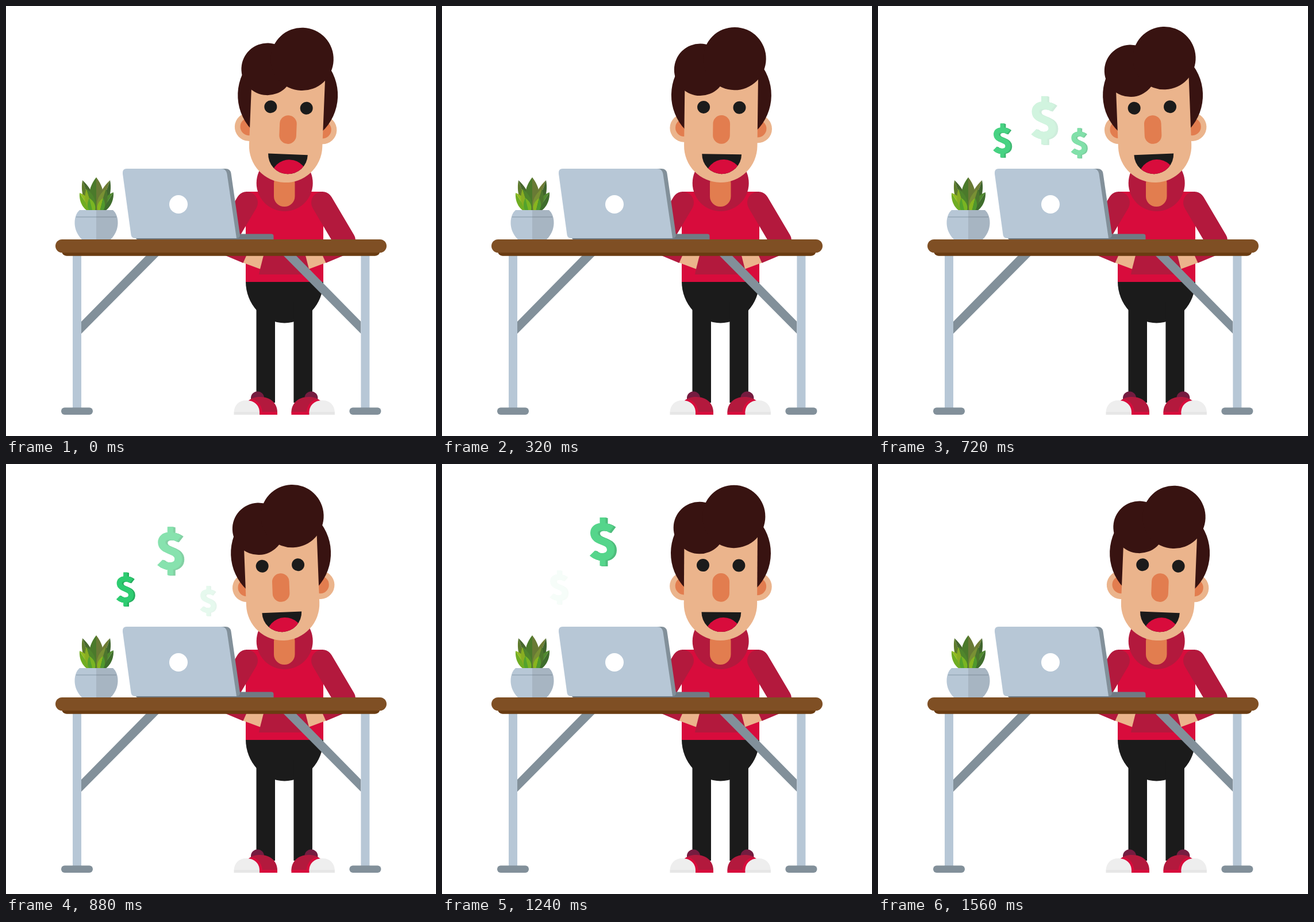
An HTML page with a canvas for the animation above (1.6 s loop, 748 by 748 pixels).

```html
<!DOCTYPE html>
<html lang="en">
<head>
<meta charset="utf-8">
<title>At the desk</title>
<style>
html, body { margin: 0; width: 100%; height: 100%; overflow: hidden; background: #fff; }
canvas { display: block; width: 100vw; height: 100vh; }
</style>
</head>
<body>
<canvas id="stage" width="748" height="748"></canvas>
<script>
const ctx = document.getElementById('stage').getContext('2d');
const LOOP = 1600;
const SKIN = '#ebb48c', ORANGE = '#e27d4f', HAIR = '#381311', BLACK = '#1b1b1b';
const RED = '#d80c3c', WINE = '#b3193d', PLUM = '#751c40';
const LIGHT = '#b7c7d6', STEEL = '#82909a';

// ---------- shape helpers ----------
function fillPath(d, color) {
  ctx.fillStyle = color;
  ctx.fill(new Path2D(d));
}
function circle(x, y, r, color) {
  ctx.fillStyle = color;
  ctx.beginPath();
  ctx.arc(x, y, r, 0, Math.PI * 2);
  ctx.fill();
}
function box(x1, y1, x2, y2, color, radii = 0) {
  ctx.fillStyle = color;
  ctx.beginPath();
  ctx.roundRect(x1, y1, x2 - x1, y2 - y1, radii);
  ctx.fill();
}
function capsule(x1, y1, x2, y2, r, color) {
  ctx.strokeStyle = color;
  ctx.lineWidth = r * 2;
  ctx.lineCap = 'round';
  ctx.beginPath();
  ctx.moveTo(x1, y1);
  ctx.lineTo(x2, y2);
  ctx.stroke();
}
// Runs draw twice: as is, and reflected about the vertical line at x.
function mirrored(x, draw) {
  draw();
  ctx.save();
  ctx.translate(2 * x, 0);
  ctx.scale(-1, 1);
  draw();
  ctx.restore();
}

// ---------- timing helpers ----------
const ramp = (t, from, to) => Math.min(1, Math.max(0, (t - from) / (to - from)));

// Smooth curve through [time, value] keys.
function track(keys, t) {
  const last = keys.length - 1;
  if (t <= keys[0][0]) return keys[0][1];
  if (t >= keys[last][0]) return keys[last][1];
  const i = keys.findIndex(k => k[0] > t) - 1;
  const slope = j => {
    const a = keys[Math.max(0, j - 1)], b = keys[Math.min(last, j + 1)];
    return (b[1] - a[1]) / (b[0] - a[0]);
  };
  const [t0, v0] = keys[i], [t1, v1] = keys[i + 1];
  const h = t1 - t0, u = (t - t0) / h, w = 1 - u;
  return v0 * w * w * (1 + 2 * u) + v1 * u * u * (3 - 2 * u)
    + h * u * w * (slope(i) * w - slope(i + 1) * u);
}

// ---------- dollar signs ----------
const S_CURVE = new Path2D('M16 -21 C7 -28 -14 -29 -14 -15 C-14 2 15 -4 15 14 C15 30 -8 29 -17 20');
const S_BARS = new Path2D('M1 -42 V-28 M1 28 V42');

const coins = [
  { size: 1, fade: [620, 1075, 1180, 1510],
    x: [[620, 292], [720, 288], [1040, 282], [1240, 278.5], [1500, 275]],
    y: [[620, 229], [720, 199], [860, 156], [960, 139], [1040, 135], [1240, 135]] },
  { size: 0.7, fade: [320, 775, 920, 1255],
    x: [[320, 248], [480, 241.5], [560, 235], [720, 215.5], [880, 207], [1040, 203.5], [1240, 202.5]],
    y: [[320, 315], [480, 287], [560, 269], [720, 234], [880, 218], [1040, 213.5], [1240, 214.5]] },
  { size: 0.62, fade: [300, 450, 590, 920],
    x: [[320, 343], [480, 345], [720, 349], [900, 351]],
    y: [[320, 316], [400, 276], [480, 245], [560, 240], [720, 238.5], [900, 238]] }
];

function tint(rgb, alpha) {
  return `rgb(${rgb.map(c => Math.round(255 + (c - 255) * alpha)).join(',')})`;
}
function strokeDollar(dx, dy, color) {
  ctx.save();
  ctx.translate(dx, dy);
  ctx.strokeStyle = color;
  ctx.lineCap = 'butt';
  ctx.lineWidth = 13;
  ctx.stroke(S_CURVE);
  ctx.lineWidth = 10;
  ctx.stroke(S_BARS);
  ctx.restore();
}
function drawCoin(coin, t) {
  const [in0, in1, out0, out1] = coin.fade;
  const alpha = ramp(t, in0, in1) * (1 - ramp(t, out0, out1));
  if (alpha <= 0) return;
  ctx.save();
  ctx.translate(track(coin.x, t), track(coin.y, t));
  ctx.scale(coin.size, coin.size);
  const side = tint([39, 174, 96], alpha);
  for (let i = 4; i > 0; i--) strokeDollar(i, i / 4, side);
  strokeDollar(0, 0, tint([46, 204, 113], alpha));
  ctx.restore();
}

// ---------- person ----------
function drawShoe() {
  circle(437.5, 682, 11.5, PLUM);
  fillPath('M414 707 C414 690 424 680 442 680 C460 680 472 691 472 707 Z', WINE);
  fillPath('M414 707 C414 690 422 682 432 685 C440 689 445 696 446 707 Z', RED);
  box(440, 706, 472, 711, RED);
  fillPath('M396.5 707 C397 694 405 686 418 686 C432 686 441 695 441 707 Z', '#eeeeee');
  box(396.5, 706, 441, 711, '#e6e6e6');
}
function drawBody() {
  fillPath('M417 479 H552 A67.5 72.5 0 0 1 417 479 Z', BLACK);
  mirrored(484.2, () => {
    box(435.5, 515, 468, 690, BLACK);
    drawShoe();
  });
  box(417, 323, 552, 480, RED);
  mirrored(484.5, () => capsule(419, 342, 380, 408, 19, WINE));
  fillPath('M447 430 H522 L529 467 H440 Z', WINE);
  mirrored(484.5, () => {
    fillPath('M416 430 H449 L442 457.5 L411 446 Z', SKIN);
    fillPath('M372 430 H420 L412.5 447 Z', WINE);
  });
  circle(484.7, 308, 49, WINE);
  box(466, 290, 502.5, 349, ORANGE, 18);
}
function shifted(dx, draw) {
  ctx.save();
  ctx.translate(dx, 0);
  draw();
  ctx.restore();
}
function drawHead(t) {
  const sway = Math.cos(t / LOOP * Math.PI * 2);
  ctx.save();
  ctx.translate(484, 306);
  ctx.rotate(0.041 * sway);
  ctx.translate(-484, -306);

  shifted(-1.8 * sway, () => mirrored(484.6, () => {
    circle(420.3, 213, 24.5, SKIN);
    circle(420.7, 212.5, 15.3, ORANGE);
  }));
  circle(484, 155, 87, HAIR);
  box(420.3, 100, 547.7, 307, SKIN, [0, 0, 63.7, 63.7]);

  shifted(2.2 * sway, () => {
    circle(452.8, 176.3, 11, BLACK);
    circle(515.2, 176.3, 11, BLACK);
  });
  shifted(2.6 * sway, () => box(469.4, 190, 499, 239.7, ORANGE, 14.8));
  shifted(3.5 * sway, () => {
    ctx.save();
    ctx.beginPath();
    ctx.arc(485, 257.7, 34.4, 0, Math.PI);
    ctx.clip();
    box(440, 250, 530, 300, BLACK);
    circle(489, 299, 32, RED);
    ctx.restore();
  });

  circle(446.7, 111.2, 45.3, HAIR);
  circle(506.3, 91.3, 54.7, HAIR);
  ctx.restore();
}

// ---------- furniture ----------
function drawTable() {
  mirrored(374.2, () => {
    fillPath('M244 434 H266 L131 570 V549 Z', STEEL);
    box(116, 430, 131, 700, LIGHT);
    box(96, 698.5, 151, 711, STEEL, 6);
  });
  box(97, 418, 650.5, 434.8, '#6a3c12', 9);
  box(86, 406, 662, 429, '#7f4f24', 11.5);
}
function drawLaptop() {
  box(226, 396.5, 465.5, 406, '#707b84', [0, 4, 0, 3]);
  fillPath('M215 283 H382 Q390 283 391.5 291 L407 398 Q407 404 400 404 H230 Z', STEEL);
  fillPath('M210 283 H374 Q383 283 384.5 292 L401 404 H225 Q218.5 404 217.5 398 L203 292 Q202 283 210 283 Z', LIGHT);
  circle(300, 345, 16, '#fff');
}
function leaf(tipX, tipY, baseX, baseY, width, left, right) {
  const dx = baseX - tipX, dy = baseY - tipY, len = Math.hypot(dx, dy);
  ctx.save();
  ctx.translate(baseX, baseY);
  ctx.rotate(Math.atan2(-dx, dy));
  const half = (side, color) => fillPath(
    `M0 0 C${side * width * 0.7} ${-len * 0.2} ${side * width} ${-len * 0.6} 0 ${-len} Z`, color);
  half(-1, left);
  half(1, right);
  ctx.restore();
}
function drawPlant() {
  leaf(133, 303, 152, 358, 13, '#5e7b2c', '#47672c');
  leaf(181, 303, 162, 358, 13, '#6f7d35', '#3f642d');
  leaf(157, 298, 157, 358, 19, '#4b7a2b', '#697a35');
  leaf(128, 325, 150, 360, 12, '#70ad22', '#92bb20');
  leaf(187, 324, 164, 360, 12, '#4f8a2d', '#3f6d2c');
  leaf(140, 318, 153, 360, 13, '#88ad22', '#4f852c');
  leaf(174, 318, 161, 360, 13, '#799034', '#4c762d');
  leaf(145, 334, 152, 362, 10, '#53a22d', '#79b522');
  leaf(169, 334, 162, 362, 10, '#88b51f', '#4f982d');

  const half = new Path2D('M157 355 H128 C117 364 115 390 132 406 H157 Z');
  ctx.fillStyle = LIGHT;
  ctx.fill(half);
  ctx.save();
  ctx.translate(314, 0);
  ctx.scale(-1, 1);
  ctx.fillStyle = '#a7b5c2';
  ctx.fill(half);
  ctx.restore();
  box(122, 366, 157, 368, '#9eafbe');
  box(157, 366, 192, 368, '#92a1ae');
}

function render(now) {
  const t = now % LOOP;
  ctx.fillStyle = '#fff';
  ctx.fillRect(0, 0, 748, 748);
  coins.forEach(coin => drawCoin(coin, t));
  drawBody();
  drawHead(t);
  drawLaptop();
  drawPlant();
  drawTable();
}
function loop() {
  render(performance.now());
  requestAnimationFrame(loop);
}
loop();
</script>
</body>
</html>
```
